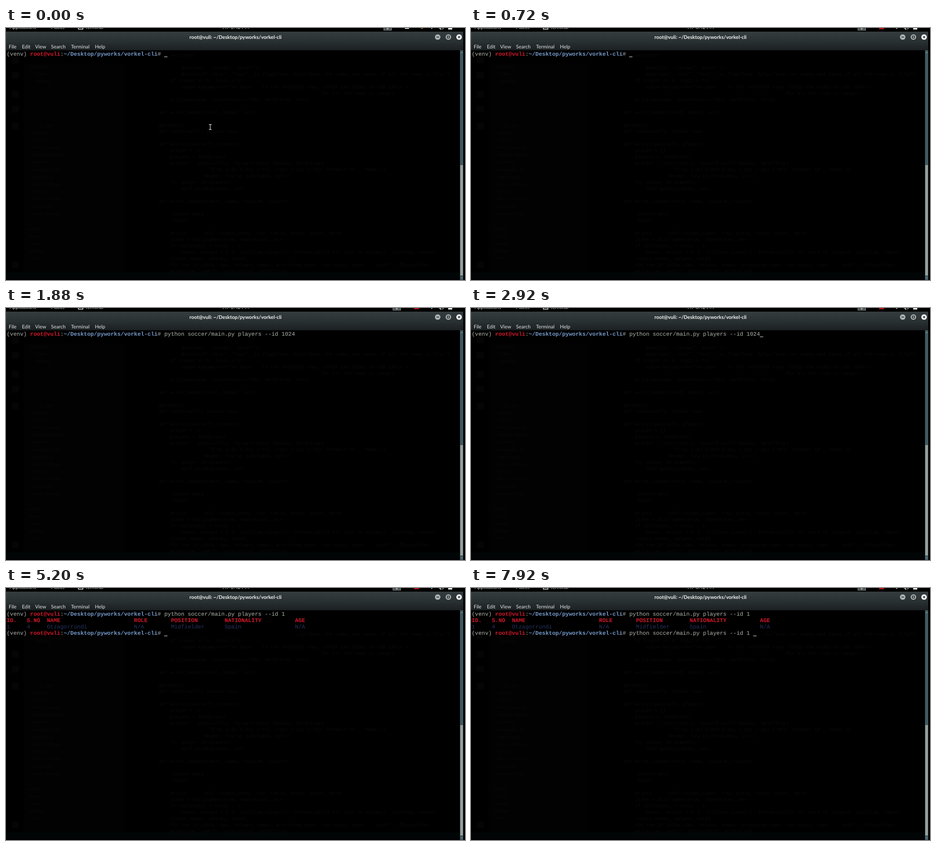
An HTML page with a canvas that plays this animation: 1009x555 px, repeating every 8000 ms.

```html
<!DOCTYPE html>
<html lang="en">
<head>
<meta charset="utf-8">
<title>Terminal session</title>
<style>
html, body { margin: 0; width: 100%; height: 100%; overflow: hidden; background: #000; }
canvas { display: block; width: 1009px; height: 555px; }
</style>
</head>
<body>
<canvas id="stage" width="1009" height="555"></canvas>
<script>
const ctx = document.getElementById('stage').getContext('2d');
const LOOP = 8000, CELL = 7.37, LEFT = 1.5, ROW = 14, BASE = 61;
const MONO = '"Liberation Mono", monospace';
const UI = 'Lato, sans-serif';
const GREY = '#b0b5ac', RED = '#d3182a', BLUE = '#759aca', DIM = '#26335f';
const GHOST = '#0a0b09';
const COMMAND = 'python soccer/main.py players --id 1024';
const SHORT = COMMAND.slice(0, -3);
const COLUMNS = [0, 6, 12, 38, 49, 65, 86];
const HEAD = ['ID.', 'S.NO', 'NAME', 'ROLE', 'POSITION', 'NATIONALITY', 'AGE'];
const DATA = ['1', '4', 'Otzagorrundi', 'N/A', 'Midfielder', 'Spain', 'N/A'];

// Key presses (ms); each one restarts the cursor blink
const RECALL = 1250, ERASE = [3000, 3150, 3300], ENTER = 4400, OUTPUT = 4800, AGAIN = 6200;
const BLINK = 600, STATUS = 200, POINTER_GONE = 560;

// Barely visible editor behind the terminal, one string per row
const CODE = `    version=1

        @option("--format", help="")
        @option("--list", "list", is_flag=True, help="Show the codes and names of all the rows in file")
    if (count == 0, limit = 5):
        raise ValueError("no data    in the selected rows, check the codes of the table")
                                                          for all the rows in range)
    print(message, color=colors.INFO, bold=True, nl=1)

def write_header(self, names, out):

@property
def table(self): return rows

def write_rows(self, players):
    player = {}
    players = load(rows)
    print(" ".join(cells), fg=self.color.header, bold=True)
                  "{:6} {:6} {:26} {:11} {:16} {:21} {:10}".format("ID", "NAME"))
                header, row in zip(names, cols)
    for player in players:
        self.print(player, out)

def write_summary(self, name, total=0, rows=1)

     return data
     total

    print(      self.format_name(  row, field, total, color, bold
    items = dict(name=value, rows=total, ok)
    if len(items) < total - 1:
        names, values = [ ], list(row.items()), [format(cell) for cell in values], join(row, names)
    return names, values, total
    for row in table.rows, values, names: print(row.name, row.total, sep=" ", end="", flush=True)
    write(row, end="", total=total, bold=True)`.split('\n');
const FILES = ['  helpers', '  modules', '', '', '', '', '', '__init__.py', 'table.py', 'main.py',
  'writer_rows.py', 'settings_default', 'loader.py', 'exceptions_list', 'requests.py', 'team_codes.py',
  'tests.py', 'data_names.py', 'licence.txt', 'setup_tools.py'];

function text(str, x, y, size, color, family = UI, weight = '') {
  ctx.font = `${weight} ${size}px ${family}`;
  ctx.fillStyle = color;
  ctx.fillText(str, x, y);
}

function rect(x, y, w, h, color) {
  ctx.fillStyle = color;
  ctx.fillRect(x, y, w, h);
}

function line(points, color, width) {
  ctx.strokeStyle = color;
  ctx.lineWidth = width;
  ctx.beginPath();
  points.forEach(([x, y], i) => i ? ctx.lineTo(x, y) : ctx.moveTo(x, y));
  ctx.stroke();
}

function cells(str, col, row, color, weight) {
  [...str].forEach((ch, i) =>
    text(ch, LEFT + (col + i) * CELL, BASE + row * ROW, 12.28, color, MONO, weight));
  return col + str.length;
}

function prompt(row) {
  let col = cells('(venv) ', 0, row, GREY);
  col = cells('root@vuli', col, row, RED, 'bold');
  col = cells(':', col, row, GREY);
  col = cells('~/Desktop/pyworks/vorkel-cli', col, row, BLUE, 'bold');
  return cells('# ', col, row, GREY);
}

function tableRow(values, row, color, weight) {
  values.forEach((v, i) => cells(v, COLUMNS[i], row, color, weight));
}

function cursor(col, row) {
  rect(LEFT + col * CELL - 0.3, BASE + row * ROW + 1.8, CELL, 1.4, GREY);
}

function ghost() {
  rect(38, 78, 220, 460, '#010201');
  rect(0, 538, 998, 14, '#010506');
  for (const y of [71, 104, 146, 179, 216, 522]) rect(13, y - 7, 15, 14, '#040606');
  text('workspace', 52, 88, 9, GHOST);
  FILES.forEach((name, i) => text(name, 58, 104 + i * 16.2, 9.5, GHOST));
  ['outline', 'names', '  writer', 'timeline', '  rows'].forEach((name, i) =>
    text(name, 50, 446 + i * 16, 9.5, GHOST));
  CODE.forEach((str, i) => text(str, 336, 63 + i * ROW, 10.25, GHOST, MONO));
}

function topBar(t) {
  rect(0, 0, 1009, 9, '#000');
  text('Applications', 8, 2.3, 10.8, '#c9cdcd');
  text('Places', 99, 2.3, 10.8, '#c9cdcd');
  text('Terminal', 174, 2.3, 10.8, '#c9cdcd');
  text('Fri  6:42 PM', 476, 1.8, 10.8, '#c9cdcd');
  line([[159, 0], [159, 2.5], [169, 2.5], [169, 0]], '#e4e6e6', 1.5);
  const early = t < STATUS;
  const boxX = early ? 830 : 850;
  rect(boxX, 0, 18, 5.5, '#8c9292');
  rect(boxX + 1, 0, 16, 4.5, '#4b5152');
  rect(boxX + 7, 1, 4, 1.5, '#d9dcdc');
  if (early) {
    rect(877, 0, 9, 2, '#c9cdcd');
    rect(912, 0, 5, 1.5, '#b5611c');
  } else {
    rect(897, 0, 11, 2.5, '#c51414');
  }
  rect(935, 0, 2, 2, '#c9cdcd');
  line([[952, 0], [956, 3], [956, 0]], '#c9cdcd', 1.4);
  line([[959, 3], [962, 0]], '#c9cdcd', 1.2);
  rect(972, 0, 9, 3.5, '#d9dcdc');
}

function button(x, color) {
  ctx.fillStyle = color;
  ctx.beginPath();
  ctx.arc(x, 20, 6.1, 0, Math.PI * 2);
  ctx.fill();
}

function chrome() {
  const shade = ctx.createLinearGradient(0, 8, 0, 49);
  shade.addColorStop(0, '#353d3f');
  shade.addColorStop(0.55, '#293032');
  shade.addColorStop(1, '#1b2022');
  rect(0, 8, 1005, 41, shade);
  ctx.textAlign = 'center';
  text('root@vuli: ~/Desktop/pyworks/vorkel-cli', 504.5, 23.7, 11, '#f1f3f3', UI, 'bold');
  ctx.textAlign = 'left';
  const menu = { File: 6, Edit: 35, View: 64, Search: 99, Terminal: 143, Help: 195.5 };
  for (const name in menu) text(name, menu[name], 44.5, 10.9, '#e3e6e6');

  button(949, '#adb2b2');
  line([[946, 20], [952, 20]], '#252b2d', 1.6);
  button(972.5, '#adb2b2');
  ctx.strokeRect(970.2, 17.7, 4.6, 4.6);
  button(996, '#f7f8f8');
  line([[993.8, 17.8], [998.2, 22.2]], '#252b2d', 1.5);
  line([[998.2, 17.8], [993.8, 22.2]], '#252b2d', 1.5);

  rect(998, 49, 7, 506, '#3f595f');
  rect(998.5, 302, 6, 243, '#969f9d');
  line([[1000, 55], [1001.7, 53], [1003.5, 55]], '#a9b2b2', 1);
  line([[1000, 549], [1001.7, 551], [1003.5, 549]], '#a9b2b2', 1);
  rect(1005, 8, 4, 547, '#000');
}

function pointer() {
  const x = 449, y = 218;
  for (const [color, width] of [['#000', 3.5], ['#d8dada', 1.3]]) {
    line([[x, y - 5], [x, y + 5]], color, width);
    for (const end of [-5.5, 5.5]) line([[x - 3, y + end], [x + 3, y + end]], color, width);
  }
}

function cursorOn(t) {
  if (t < RECALL) return true;
  const last = [RECALL, ...ERASE, ENTER, OUTPUT, AGAIN].filter(k => k <= t).pop();
  return Math.floor((t - last) / BLINK) % 2 === 0;
}

function draw(t) {
  ctx.textRendering = 'geometricPrecision';
  rect(0, 0, 1009, 555, '#000');
  ghost();
  topBar(t);
  chrome();

  let row = 0;
  let col = prompt(0);
  if (t >= RECALL) {
    const erased = ERASE.filter(k => k <= t).length;
    col = cells(COMMAND.slice(0, COMMAND.length - erased), col, 0, GREY);
  }
  if (t >= ENTER) {
    row = 1;
    col = 0;
  }
  if (t >= OUTPUT) {
    rect(0, 64, 998, 28, '#000');
    rect(0, 92, 640, 14, '#000');
    tableRow(HEAD, 1, RED, 'bold');
    tableRow(DATA, 2, DIM);
    row = 3;
    col = prompt(3);
    if (t >= AGAIN) col = cells(SHORT + ' ', col, 3, GREY);
  }
  if (cursorOn(t)) cursor(col, row);
  if (t < POINTER_GONE) pointer();
}

const start = performance.now();
function tick() {
  draw((performance.now() - start) % LOOP);
  requestAnimationFrame(tick);
}
tick();
</script>
</body>
</html>
```
